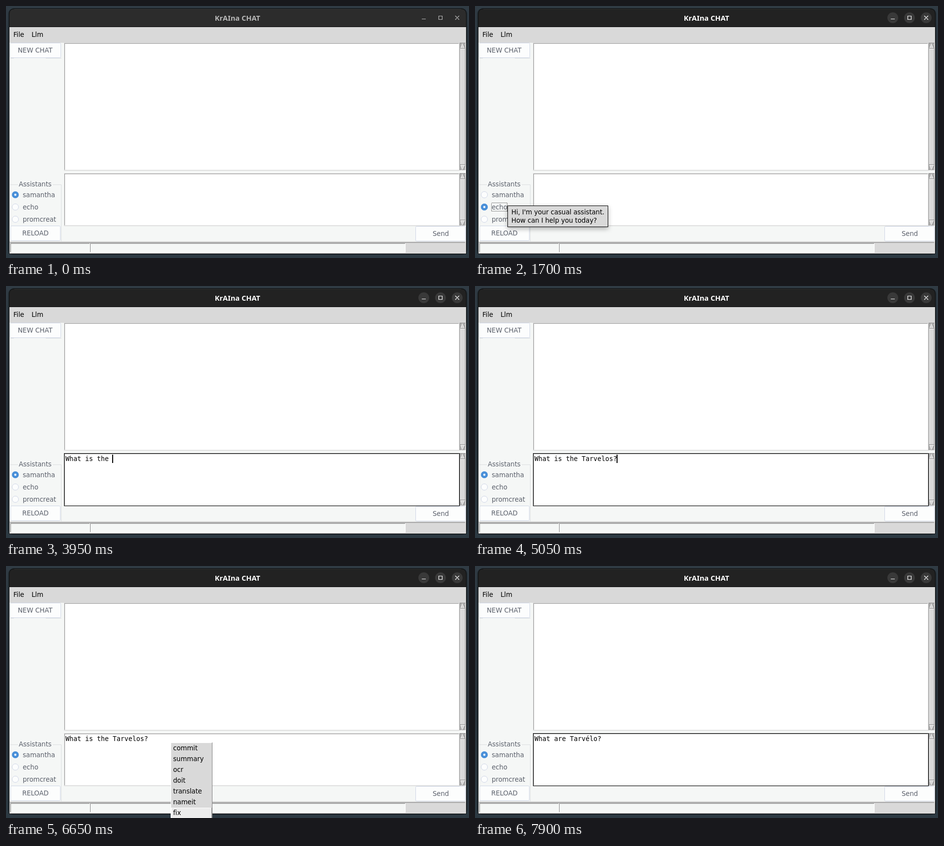
Recreate the animation shown at these times as an HTML page. Size 942 by 514 pixels, loop 8 s.

```html
<!DOCTYPE html>
<html lang="en">
<head>
<meta charset="utf-8">
<title>KrAIna CHAT</title>
<style>
html, body { margin: 0; width: 100%; height: 100%; overflow: hidden; background: #2a343c; }
svg { display: block; }
text { font: 13.33px "DejaVu Sans", sans-serif; letter-spacing: -.1px; fill: #5c616c; white-space: pre; }
text.dark { fill: #000; }
text.title { font: bold 14.67px "Noto Sans", sans-serif; letter-spacing: 0; text-anchor: middle; }
text.mono { font: 13.29px "DejaVu Sans Mono", monospace; letter-spacing: 0; fill: #000; }
rect { shape-rendering: crispEdges; }
.smooth { shape-rendering: auto; }
.tip { filter: drop-shadow(0 4px 5px rgba(0, 0, 0, .28)); }
</style>
</head>
<body>
<svg id="stage" width="942" height="514" viewBox="0 0 942 514">
  <defs>
    <linearGradient id="desk" x2="0" y2="1">
      <stop offset="0" stop-color="#303b44"/>
      <stop offset=".5" stop-color="#283139"/>
      <stop offset="1" stop-color="#2c3942"/>
    </linearGradient>
  </defs>
</svg>
<script>
const LOOP = 8000, STEP = 50;
const PANEL = '#f5f7f6', GREY = 217, BLUE = '#4a90d9', EDGE = '#cfd6e6';
const stage = document.getElementById('stage');

function add(parent, tag, attrs, content) {
  const el = document.createElementNS('http://www.w3.org/2000/svg', tag);
  for (const key in attrs) el.setAttribute(key, attrs[key]);
  if (content !== undefined) el.textContent = content;
  return parent.appendChild(el);
}
const group = (parent = stage, attrs) => add(parent, 'g', attrs);
const box = (p, x, y, width, height, fill, more) =>
  add(p, 'rect', { x, y, width, height, fill, ...more });
const outline = (p, x, y, w, h, stroke, fill = 'none', more) =>
  box(p, x + .5, y + .5, w - 1, h - 1, fill, { stroke, ...more });
const label = (p, x, y, s, cls = '') => add(p, 'text', { x, y, class: cls }, s);
const path = (p, d, stroke, fill = 'none', more) => add(p, 'path', { d, stroke, fill, ...more });
const circle = (p, cx, cy, r, fill, more) => add(p, 'circle', { cx, cy, r, fill, ...more });
const show = (el, on) => el.setAttribute('visibility', on ? 'inherit' : 'hidden');

// toolkit shading: edge colours follow from the grey level of the face
const grey = v => `rgb(${v},${v},${v})`;
const dark = v => grey(Math.round(v * .6));
const light = v => grey(v > 242 ? Math.round(v * .9) : Math.min(255, Math.max(v * 1.4, (v + 255) / 2)));

function bevel(p, x, y, w, h, level, sunken, fill = grey(level)) {
  const edges = [light(level), dark(level)];
  if (sunken) edges.reverse();
  box(p, x, y, w, h, edges[1]);
  box(p, x, y, w - 1, h - 1, edges[0]);
  box(p, x + 1, y + 1, w - 2, h - 2, fill);
}

function textArea(p, y, h, focused, level) {
  box(p, 118, y, 805, h, focused ? '#000' : grey(GREY));
  bevel(p, 119, y + 1, 803, h - 2, level, true);
}

function scrollbar(p, y, h) {
  bevel(p, 923, y, 13, h, GREY, true, '#b3b3b3');
  for (const [tip, dir] of [[y + 1, 1], [y + h - 1, -1]]) {
    const base = tip + dir * 10.5;
    path(p, `M929.5 ${tip}L934.5 ${base}H924.5Z`, dark(GREY), grey(GREY));
    path(p, dir > 0 ? `M929.5 ${tip}L924.5 ${base}` : `M934 ${base}H924.5L929 ${tip - 1}`, '#fff');
  }
  bevel(p, 924, y + 12, 11, h - 24, GREY, false);
}

function button(x, y, w, s, tx) {
  outline(stage, x, y, w, 31, EDGE, '#fcfdfd', { rx: 2, class: 'smooth' });
  label(stage, tx, y + 20, s);
}

// desktop and window
box(stage, 0, 0, 942, 514, 'url(#desk)');
box(stage, 4, 4, 935, 504, '#1d252b', { rx: 13, class: 'smooth', opacity: .55 });
path(stage, 'M6 506V17Q6 5 18 5H925Q937 5 937 17V506Z', 'none', '#0c0d0e');

function titleBar(active) {
  const g = group();
  path(g, 'M7 42V17Q7 6 18 6H925Q936 6 936 17V42Z', 'none', active ? '#222' : '#2c2c2c');
  path(g, 'M17 6.5H926', active ? '#333' : '#3a3a3a');
  const ink = active ? '#fff' : '#b8b8b8';
  label(g, 471, 30, 'KrAIna CHAT', 'title').style.fill = ink;
  if (active) for (let i = 0; i < 3; i++) circle(g, 850 + 34 * i, 24, 11, '#393939');
  path(g, 'M846 26.5H854M880.5 20.5H887.5V27.5H880.5ZM914 20L922 28M922 20L914 28', ink,
    'none', { 'stroke-width': 1.2 });
  return g;
}
const inactiveBar = titleBar(false), activeBar = titleBar(true);

box(stage, 7, 43, 929, 32, grey(GREY));
label(stage, 15, 63, 'File', 'dark');
label(stage, 52, 63, 'Llm', 'dark');
box(stage, 7, 75, 929, 407, PANEL);

// left column
path(stage, 'M8 106.5H16M81 106.5H113M8 364.5H24M95 364.5H112.5V480', '#dcdfe1');
button(8, 75, 104, 'NEW CHAT', 24);
button(9, 448, 102, 'RELOAD', 33);
label(stage, 26, 368, 'Assistants');

const radios = ['samantha', 'echo', 'promcreat'].map((name, i) => {
  const cy = 385 + 25 * i;
  const dot = circle(stage, 19, cy, 6.5, '#fcfdfd', { stroke: EDGE });
  const on = group();
  circle(on, 19, cy, 7, BLUE);
  circle(on, 19, cy, 2.2, '#fff');
  const width = Math.round(label(stage, 34, cy + 5, name).getComputedTextLength()) + 1;
  const ring = outline(stage, 33, cy - 9, width, 18, '#333', 'none', { 'stroke-dasharray': '1 1' });
  return { dot, on, ring };
});

// chat history, send button and status bar
textArea(stage, 75, 261, false, 255);
scrollbar(stage, 75, 261);
button(833, 449, 102, 'Send', 868);
box(stage, 7, 480, 929, 25, grey(GREY));
box(stage, 8, 482, 926, 1, dark(GREY));
bevel(stage, 9, 484, 162, 19, GREY, true, PANEL);
bevel(stage, 171, 484, 642, 19, GREY, true, PANEL);

// prompt field in its three looks
function prompt(h, focused, level) {
  const g = group();
  textArea(g, 341, h, focused, level);
  scrollbar(g, 341, h);
  return g;
}
const idleField = prompt(108, false, 255);
const focusField = prompt(108, true, 255);
const busyField = prompt(98, true, 128);
const pill = { rx: 4, class: 'smooth' };
box(busyField, 119, 440, 816, 8, EDGE, pill);
const runner = box(busyField, 119, 440, 30, 8, BLUE, pill);
const typed = label(stage, 121, 357, '', 'mono');
const caret = box(stage, 0, 344, 2, 17, '#000');

function tooltip(x, y, w, kind) {
  const g = group(stage, { class: 'tip' });
  outline(g, x, y, w, 44, '#000', grey(GREY));
  label(g, x + 8, y + 18, `Hi, I'm your ${kind} assistant.`, 'dark');
  label(g, x + 8, y + 35, 'How can I help you today?', 'dark');
  return g;
}
const tips = [tooltip(106, 384, 209, 'default'), tooltip(66, 407, 205, 'casual')];

// context menu
const menu = group();
bevel(menu, 335, 360, 85, 170, GREY, false);
const bars = ['commit', 'summary', 'ocr', 'doit', 'translate', 'nameit', 'fix'].map((name, i) => {
  const y = 361 + 22 * i, bar = group(menu);
  bevel(bar, 336, y, 83, 22, 236, false);
  label(menu, 340, y + 15, name, 'dark');
  return bar;
});

// bursts of typing, one key per step
const bursts = [[2750, 'What is'], [3500, ' '], [3700, 'the'], [3950, ' '], [4350, 'Tarve'], [4700, 'los?']];
const ANSWER = 'What are Tarvélo?';

function typedAt(t) {
  if (t >= 7600) return { text: ANSWER, lastKey: 7600 };
  let text = '', lastKey = 2200;
  for (const [start, part] of bursts) {
    if (t < start) break;
    const keys = Math.min(part.length, (t - start) / STEP + 1);
    text += part.slice(0, keys);
    lastKey = start + (keys - 1) * STEP;
  }
  return { text, lastKey };
}

function render(time) {
  const t = Math.floor(time / STEP) * STEP;
  const during = (from, to) => t >= from && t < to;
  const menuOpen = during(5950, 6900), busy = during(6900, 7600);
  const focused = t >= 2200 && !menuOpen && !busy;

  show(inactiveBar, t < 950);
  show(activeBar, t >= 950);

  // the pointer rests on a radio, clicks it, then moves on
  const hover = during(1150, 1900) ? 1 : during(550, 2200) ? 0 : -1;
  const chosen = during(1300, 2000) ? 1 : 0;
  radios.forEach(({ dot, on, ring }, i) => {
    show(on, i === chosen);
    show(ring, i === chosen && during(950, 2200));
    dot.setAttribute('stroke', i === hover ? '#8fb8e6' : EDGE);
  });
  show(tips[0], during(800, 950));
  show(tips[1], during(1700, 1900));

  show(idleField, t < 2200 || menuOpen);
  show(focusField, focused);
  show(busyField, busy);
  runner.setAttribute('x', 119 + 786 * Math.max(0, t - 6950) / 1000);

  const { text, lastKey } = typedAt(t);
  typed.textContent = busy ? '' : text;
  caret.setAttribute('x', Math.max(121, 120 + 8 * text.length));
  show(caret, focused && (t - lastKey) % 450 < 300);

  show(menu, menuOpen);
  const picked = t < 6250 ? -1 : t < 6650 ? Math.min(5, Math.floor((t - 6250) / 40)) : 6;
  bars.forEach((bar, i) => show(bar, menuOpen && i === picked));
}

function tick() {
  render(performance.now() % LOOP);
  requestAnimationFrame(tick);
}
tick();
</script>
</body>
</html>
```
